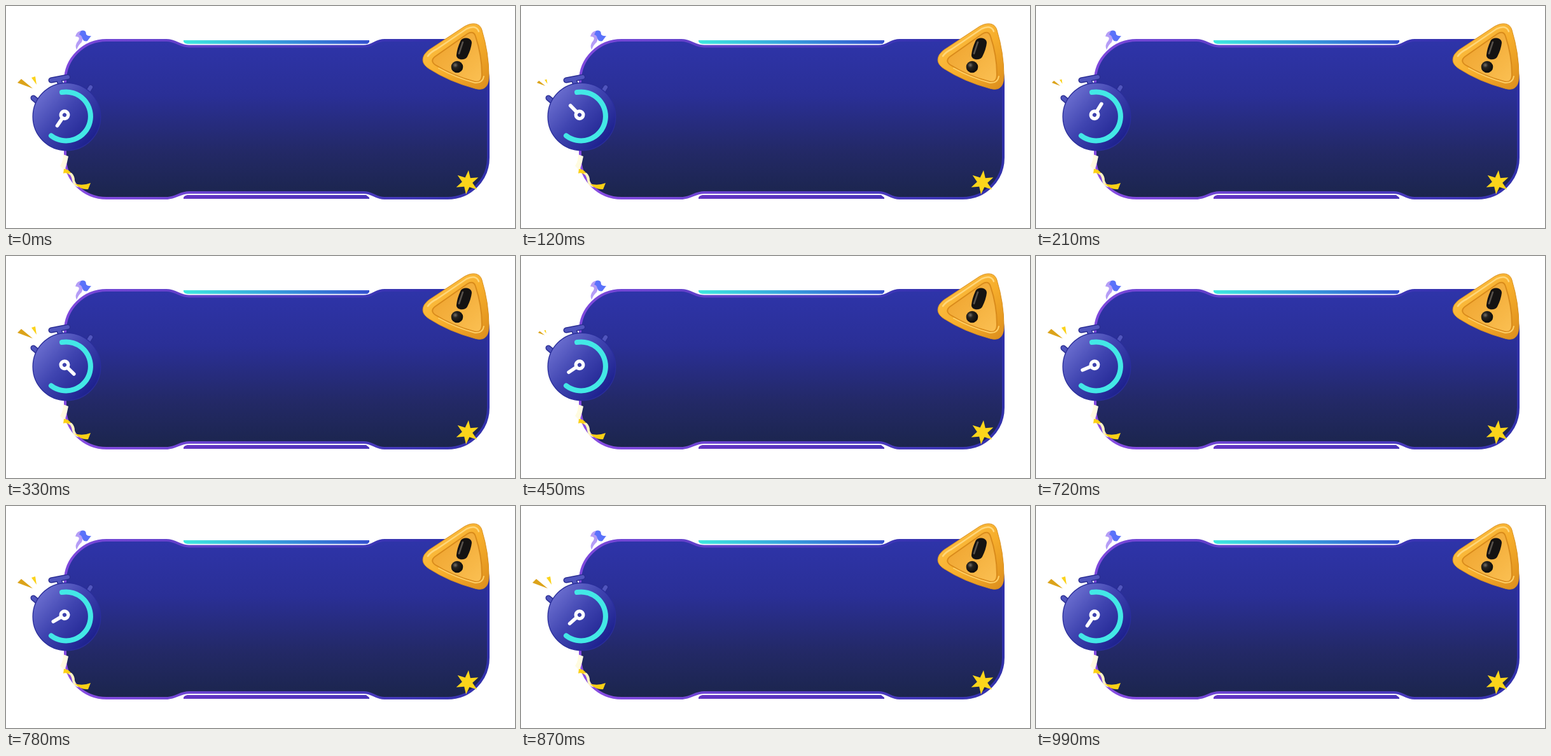
Recreate the animation shown at these times as an HTML page. Size 800 by 350 pixels, loop 1380 ms.

```html
<!DOCTYPE html>
<html lang="en">
<head>
<meta charset="utf-8">
<title>Stopwatch banner</title>
<style>
  html, body { margin: 0; width: 100%; height: 100%; overflow: hidden; background: #fff; }
  svg { display: block; width: 100%; height: 100%; }
</style>
</head>
<body>
<svg viewBox="0 0 800 350" xmlns="http://www.w3.org/2000/svg">
  <defs>
    <linearGradient id="fill" x1="0" y1="0" x2="0" y2="1">
      <stop offset="0" stop-color="#2e34a9"/>
      <stop offset=".35" stop-color="#2a2f96"/>
      <stop offset=".7" stop-color="#232967"/>
      <stop offset="1" stop-color="#1b254c"/>
    </linearGradient>
    <linearGradient id="edge" gradientUnits="userSpaceOnUse" x1="91" y1="290" x2="690" y2="52">
      <stop offset="0" stop-color="#8a4de4"/>
      <stop offset=".45" stop-color="#5c3fc6"/>
      <stop offset=".8" stop-color="#4037b8"/>
      <stop offset="1" stop-color="#2f30a9"/>
    </linearGradient>
    <linearGradient id="topBar">
      <stop offset="0" stop-color="#3fe9df"/>
      <stop offset=".5" stop-color="#389bdc"/>
      <stop offset="1" stop-color="#3450cf"/>
    </linearGradient>
    <linearGradient id="lowBar">
      <stop offset="0" stop-color="#6435c4"/>
      <stop offset="1" stop-color="#4b35ba"/>
    </linearGradient>
    <linearGradient id="dial" x1=".12" y1=".12" x2=".9" y2=".85">
      <stop offset="0" stop-color="#6c6fd0"/>
      <stop offset=".45" stop-color="#3f44b0"/>
      <stop offset="1" stop-color="#1b1f8c"/>
    </linearGradient>
    <linearGradient id="rim" x1="0" y1="0" x2="1" y2="1">
      <stop offset="0" stop-color="#ffc64c"/>
      <stop offset=".55" stop-color="#f6ad2b"/>
      <stop offset="1" stop-color="#dc8d1b"/>
    </linearGradient>
    <linearGradient id="face" x1="0" y1="0" x2="1" y2="1">
      <stop offset="0" stop-color="#eda02a"/>
      <stop offset="1" stop-color="#fbc052"/>
    </linearGradient>
    <radialGradient id="ball" cx=".35" cy=".35" r=".65">
      <stop offset="0" stop-color="#77716a"/>
      <stop offset=".35" stop-color="#25221f"/>
      <stop offset="1" stop-color="#0c0b0b"/>
    </radialGradient>
  </defs>

  <!-- Panel -->
  <path d="M93 118C93 83 122 54 158 54H252C267 54 273 63.5 288 63.5H562C577 63.5 580 54 595 54H694A64 64 0 0 1 758 118V239A64 64 0 0 1 694 303H595C580 303 577 294 562 294H288C273 294 267 303 252 303H158C122 303 93 274 93 239Z"
    fill="url(#fill)" stroke="url(#edge)" stroke-width="4"/>
  <path d="M279 54H571V57L568 59.8H285Q280 59 279 56Z" fill="url(#topBar)"/>
  <path d="M285 298H566L571 302V304H279V302Q280 299 285 298Z" fill="url(#lowBar)"/>

  <!-- Ribbons -->
  <path d="M109 48Q111 39 120 39L118 44Q122 51 119 57Q114 61 111 69Q107 62 114 54Q117 48 109 48Z" fill="#b59df6"/>
  <path d="M118 39Q126 37 126 45Q129 48 134 47L128 55Q122 57 120 51Q119 46 115 45Z" fill="#5a72fa"/>
  <path d="M90 234L98 237Q96 248 92 260L85 252Q90 245 90 234Z" fill="#fffbe0"/>
  <path d="M91 257Q97 256 103 264L100 266Q95 262 90 264Z" fill="#fbd116"/>
  <path d="M98 264L103 263Q108 268 108 275Q110 282 115 286Q105 284 104 275Q103 267 98 264Z" fill="#fff5c4"/>
  <path d="M108 280Q120 284 133 279L129 289Q118 290 108 280Z" fill="#fbd116"/>
  <polygon id="star" fill="#fcd51b"/>

  <!-- Warning sign -->
  <path d="M658 76Q662 70 671 65L721 32C734 25 745 27 748 38Q759 74 759 110C759 128 751 134 737 130Q696 119 665 99C654 92 653 84 658 76Z" fill="url(#rim)" stroke="#d9901f"/>
  <path d="M663 79Q668 72 677 68L724 36Q739 29 743 40" fill="none" stroke="#ffd77b" stroke-width="2.5" stroke-linecap="round"/>
  <path d="M674 80L725 44Q735 38 738 48Q748 78 748 108Q748 122 736 119Q702 110 675 93Q666 87 674 80Z" fill="url(#face)" stroke="#d98b1b" stroke-width="2"/>
  <path d="M680 98Q707 113 737 121Q749 122 751 111" fill="none" stroke="#ffcf65" stroke-width="2" stroke-linecap="round"/>
  <path d="M714 56C717 48 732 49 732 58Q731 68 725 80C721 87 707 85 708 77Q709 67 714 56Z" fill="#151312"/>
  <path d="M718 57L712 75" stroke="#59534d" stroke-width="2.5" stroke-linecap="round"/>
  <circle cx="709" cy="96" r="9.3" fill="url(#ball)"/>

  <!-- Stopwatch -->
  <g stroke-linecap="round" fill="none">
    <path id="knobs" d="M71 117L97 112M83 116L86 124M43 145L50 151M133 128L128 136" stroke="#2a2e93" stroke-width="9"/>
    <path d="M71 117L97 112M83 116L86 124M43 145L50 151M133 128L128 136" stroke="#5055bd" stroke-width="6"/>
    <circle cx="95.5" cy="174.5" r="53.3" fill="url(#dial)" stroke="#2a2e9b" stroke-width="1.4"/>
    <path d="M88 136A38.5 38.5 0 1 1 71 204.5" stroke="#43e8e6" stroke-width="8"/>
  </g>
  <g id="hand" stroke="#fff" fill="none">
    <circle r="5.8" stroke-width="5.4"/>
    <path d="M0 -8V-20.5" stroke-width="5.6" stroke-linecap="round"/>
  </g>

  <g id="sparks">
    <path d="M18 121L24 115L42 130Z" fill="#dca31a"/>
    <path d="M40 113L46 111L48 124Z" fill="#fbd31c"/>
  </g>
</svg>
<script>
  const LOOP = 1380, STEP = 30, MOVE_END = 990;
  const START = 214, PEAK = 420;
  const byId = id => document.getElementById(id);
  const hand = byId('hand'), sparks = byId('sparks');

  const starPoints = Array.from({ length: 12 }, (_, i) => {
    const a = (6 + i * 30) * Math.PI / 180, r = i % 2 ? 8.2 : 19;
    return `${725 + r * Math.sin(a)},${278 - r * Math.cos(a)}`;
  });
  byId('star').setAttribute('points', starPoints.join(' '));

  // Sweep past a full turn, then drift back to it.
  function turn(t) {
    const half = MOVE_END / 2;
    return t < half ? PEAK * t / half : PEAK - (PEAK - 360) * (t - half) / half;
  }

  // Dips to its smallest halfway through the span.
  function dip(t, from, to) {
    if (t < from || t > to) return 0;
    return (1 - Math.cos(2 * Math.PI * (t - from) / (to - from))) / 2;
  }

  function draw(time) {
    const t = Math.min(Math.floor(time % LOOP / STEP) * STEP, MOVE_END);
    const size = 1 - 0.54 * dip(t, 0, 330) - 0.57 * dip(t, 330, 570);
    hand.setAttribute('transform', `translate(92 171.7) rotate(${START + turn(t)})`);
    sparks.setAttribute('transform', `translate(33.5 121) scale(${size}) translate(-33.5 -121)`);
  }

  const begin = performance.now();
  function tick() {
    draw(performance.now() - begin);
    requestAnimationFrame(tick);
  }
  tick();
</script>
</body>
</html>
```
